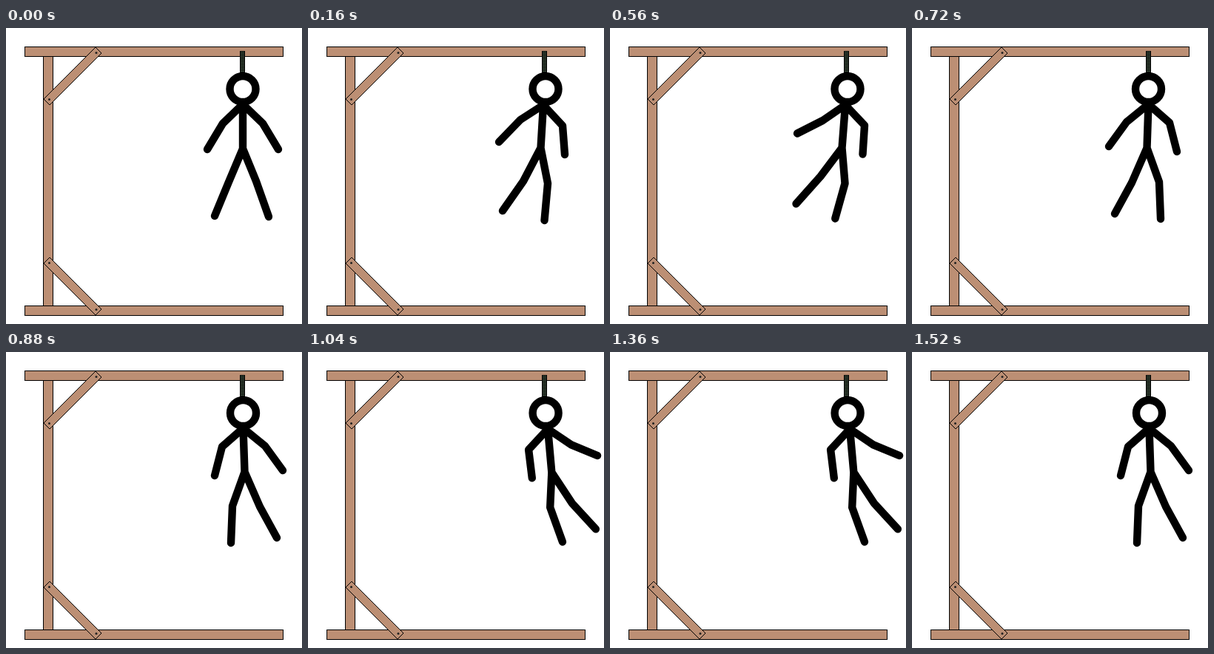
An HTML page that plays this animation: 400x400 px, repeating every 1.6 s.

```html
<!DOCTYPE html>
<html lang="en">
<head>
<meta charset="utf-8">
<title>Swinging stick figure</title>
<style>
  html, body { margin: 0; width: 100%; height: 100%; overflow: hidden; background: #fff; }
  svg { display: block; width: 100vw; height: 100vh; }
  .wood { fill: #bc8f74; stroke: #000; stroke-width: 1; }
  .figure { fill: none; stroke: #000; stroke-width: 10.4; stroke-linecap: round; stroke-linejoin: round; }
</style>
</head>
<body>
<svg viewBox="0 0 400 400">
  <g class="wood">
    <rect x="50.5" y="38.5" width="13" height="337"/>
    <rect x="25.5" y="25.5" width="349" height="13"/>
    <rect x="25.5" y="375.5" width="349" height="13"/>
    <path d="M121 26l8 8-70 70-8-8z"/>
    <path d="M59 310l-8 8 70 70 8-8z"/>
  </g>
  <g fill="#222">
    <circle cx="58.5" cy="96.5" r="1.5"/>
    <circle cx="122" cy="33.5" r="1.5"/>
    <circle cx="58.5" cy="317.5" r="1.5"/>
    <circle cx="122" cy="380.5" r="1.5"/>
  </g>
  <rect x="316" y="31" width="7" height="32" fill="#000"/>
  <path d="M319.5 32V62" stroke="#465a46" stroke-width="5" stroke-dasharray="1"/>
  <g class="figure">
    <circle id="head" cy="82.5" r="17.5" fill="#fff"/>
    <path id="limbs"/>
  </g>
</svg>
<script>
  // Each pose leans left: head x, neck, hip, then elbow/hand and knee/foot
  // pairs for the leading and the trailing side.
  const rest = [320, 320,103, 320,163, 293,129, 272,164, 347,129, 368,164, 301,208, 282,254, 338,207, 355,255];
  const slight = [319.5, 319.5,103, 317.5,162, 290,127, 266,160, 348,128, 358,167, 297,209, 274,251, 334,208, 336,258];
  const middle = [321, 318,104, 314.5,162, 287,124, 258,154, 344,132, 347,171, 291,207, 263,247, 324,210, 319.5,260];
  const leftPeak = [321, 318,104, 312.5,162, 288,126, 248,131, 344,131, 336,170, 278,194, 240,228, 311,210, 289,255];
  const rightPeak = [318, 315,104, 309,163, 283,126, 245,134, 341,132, 333,170, 280,203, 246,236, 308,210, 286,255];

  const mix = (a, b, t) => a.map((v, i) => v + (b[i] - v) * t);
  // Index 0 and every odd index hold an x coordinate.
  const mirror = pose => pose.map((v, i) => i === 0 || i % 2 ? 640 - v : v);

  const wide = mix(middle, leftPeak, .5), wider = mix(middle, leftPeak, .8);
  const wideR = mix(middle, rightPeak, .7), widerR = mix(middle, rightPeak, .85);
  const steps = [
    rest, slight, middle, wide, wider, leftPeak, wider, wide, middle, slight,
    rest, ...[slight, middle, wideR, widerR, rightPeak, widerR, wideR, wideR, slight].map(mirror)
  ];
  const stepTime = 80;
  const head = document.getElementById('head');
  const limbs = document.getElementById('limbs');

  function draw(pose) {
    const at = n => `${pose[1 + 2 * n]} ${pose[2 + 2 * n]}`;
    const line = (...joints) => 'M' + joints.map(at).join('L');
    head.setAttribute('cx', pose[0]);
    limbs.setAttribute('d',
      line(0, 1) + line(0, 2, 3) + line(0, 4, 5) + line(1, 6, 7) + line(1, 8, 9));
  }

  let start;
  function tick(now) {
    start ??= now;
    draw(steps[Math.floor((now - start) / stepTime) % steps.length]);
    requestAnimationFrame(tick);
  }
  draw(rest);
  requestAnimationFrame(tick);
</script>
</body>
</html>
```
